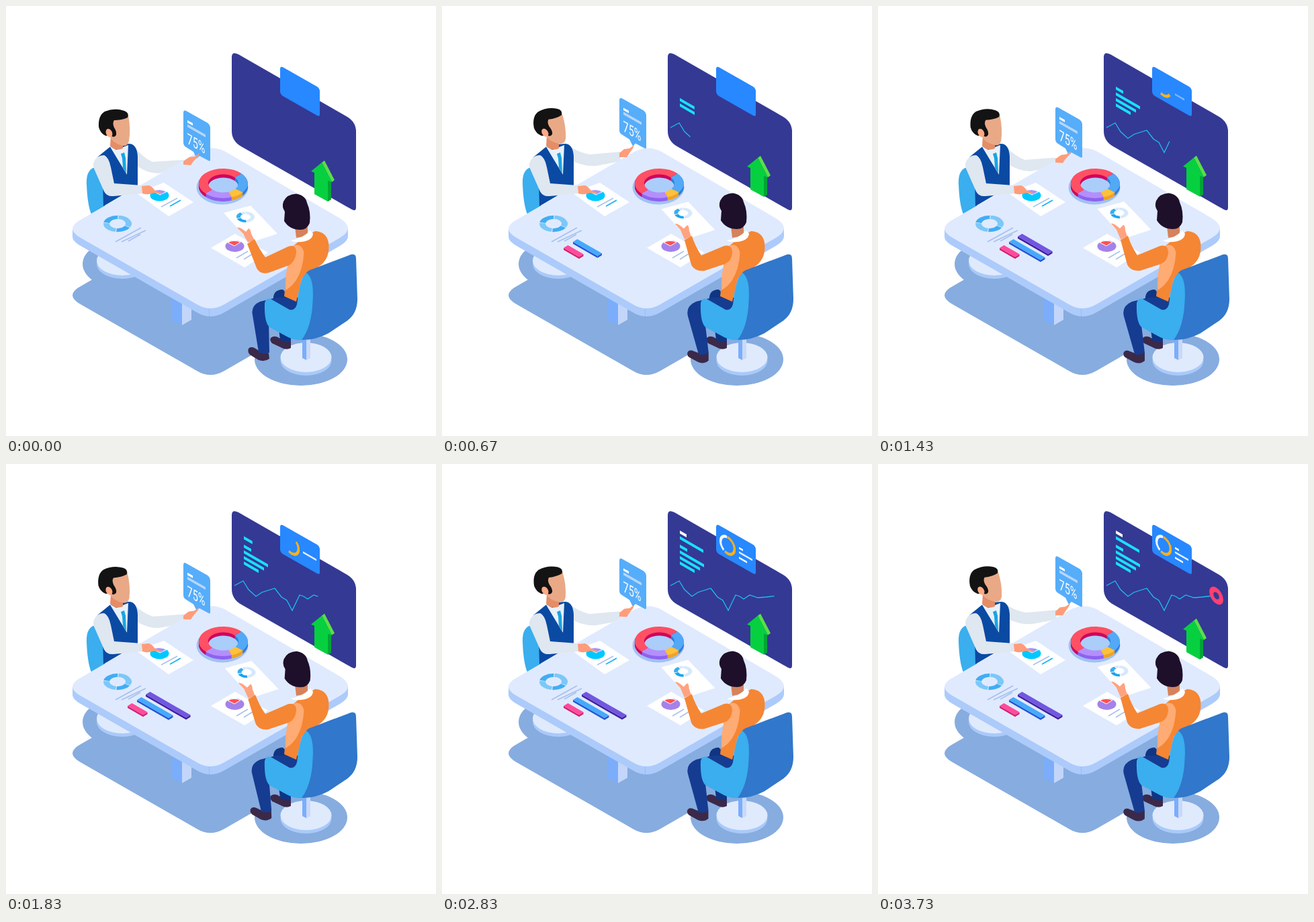
Write an HTML page that moves like this. It is 640x640 px and loops after 3.76 s.

```html
<!DOCTYPE html>
<html lang="en">
<head>
<meta charset="utf-8">
<title>Meeting</title>
<style>
  html, body { margin: 0; width: 100%; height: 100%; overflow: hidden; background: #fff; }
  svg { display: block; width: 100vw; height: 100vh; }
</style>
</head>
<body>
<svg viewBox="0 0 640 640">
  <defs>
    <path id="slab" d="M113 317L286 217Q307 206 327 217L497 316Q521 331 497 345L325 444Q304 456 284 444L111 345Q86 331 113 317Z"/>
  </defs>

  <!-- floor -->
  <g fill="#87acdf">
    <use href="#slab" y="99"/>
    <ellipse cx="183" cy="384" rx="69" ry="39"/>
    <ellipse cx="439" cy="526" rx="69" ry="39"/>
  </g>
  <ellipse cx="173" cy="384" rx="38" ry="22" fill="#a9caf9"/>
  <ellipse cx="173" cy="379" rx="38" ry="22" fill="#e0eafd"/>

  <!-- wall screen -->
  <path fill="#343994" d="M336 76Q336 67 346 72L508 165Q521 173 521 187V300Q521 306 515 303L350 209Q336 201 336 186Z"/>
  <path id="graph" pathLength="1" fill="none" stroke="#1cbfee" stroke-width="1.3" d="M340 181L353 174L361 187L372 197L381 191L400 185L410 198L418 203L426 218L437 195L443 197L449 201L458 195L470 199L482 198L495 196.500"/>
  <g id="lines"></g>
  <g transform="matrix(.866 .5 0 1 503.5 196)"><circle id="target" r="8.5" fill="none" stroke="#ff4070" stroke-width="7"/></g>
  <path fill="#2788ff" d="M408 94Q408 89 412 91L463 120Q467 123 467 127V162Q467 165 463 163L412 134Q408 131 408 127Z"/>
  <g transform="matrix(.866 .5 0 1 425 121)" fill="none" stroke-width="4">
    <path id="gaugeWhite" stroke="#f2f7ff"/>
    <path id="gaugeGold" stroke="#ffb01f"/>
  </g>
  <g id="notes"></g>
  <g id="arrow">
    <path fill="#5ade48" d="M470 233L474 230L489 259L485 262Z"/>
    <path fill="#00a636" d="M479 260L484 261V288L479 291Z"/>
    <path fill="#06d040" d="M454 246L470 233L485 262L479 260V291L459 280V248Z"/>
  </g>

  <!-- man on the left -->
  <path fill="#3aaeee" d="M133 240Q119 243 120 265Q121 295 127 310L147 300L150 240Z"/>
  <path class="point" fill="#dfe7f0" d="M190 209Q204 226 218 232L264 229L266 243L226 249Q210 249 195 238Z" data-to="M190 209Q204 218 220 221L265 217L266 231L229 238Q212 239 195 231Z"/>
  <path fill="#0a4aa3" d="M136 225L158 207L184 205Q195 206 196 224V268L145 298L144 260Z"/>
  <path fill="#e8f1fa" d="M154 208L164 214L182 207L180 251Z"/>
  <path fill="#1ba4e2" d="M171 220L176 218L178 226L179 249L174 241L173 227Z"/>
  <path fill="#e58d66" d="M156 194L174 200V212Q163 217 155 208Z"/>
  <g id="head">
    <path fill="#e9a987" d="M157 168L182 163Q186 183 183 201Q181 209 174 208Q160 205 154 194Z"/>
    <path fill="#131313" d="M138 180Q137 163 147 157Q162 151 176 156Q184 159 181 166Q173 170 161 170Q158 174 161 181Q165 187 164 192Q161 197 156 193L148 193Q140 189 138 180Z"/>
    <ellipse cx="153.500" cy="189" rx="4.500" ry="6.500" fill="#ffa985" transform="rotate(-25 153.500 189)"/>
  </g>

  <!-- table -->
  <path fill="#7badfb" d="M247 420H262V475L247 468Z"/>
  <path fill="#c3d6f9" d="M262 420H276V467L262 475Z"/>
  <g fill="#accbfb"><use href="#slab" y="12"/><path d="M99 331H509V343H99Z"/></g>
  <use href="#slab" fill="#e0eafe"/>
  <path stroke="#98bdf5" d="M302.500 451V462"/>
  <g id="tableRing" transform="translate(166 324) scale(1 .58)"></g>
  <path stroke="#a8c1ee" stroke-width="1.800" d="M163 351L201 330M172 351L208 334M182 350L200 340"/>
  <g id="bars"></g>
  <ellipse cx="322" cy="270" rx="38.500" ry="25.500" fill="#9fc2f5"/>
  <ellipse cx="323" cy="269" rx="26" ry="16" fill="#abcdfa"/>
  <g id="donut"></g>

  <!-- sheets -->
  <path fill="#fff" d="M194 278L235 263L279 292L242 313ZM305 360L341 339L390 367L355 389Z"/>
  <ellipse cx="228.500" cy="282" rx="14" ry="8.500" fill="#00c8ff"/>
  <path fill="#a98ff5" stroke="#fff" d="M229 281L219 275.500Q228 271 239 276.500Z"/>
  <path stroke="#a8c1ee" stroke-width="1.500" d="M231 299L255 286M343 375L360 365M354 377L367 369"/>
  <path stroke="#1bb4f3" stroke-width="1.800" d="M244 298L260 289"/>
  <ellipse cx="340.500" cy="357.500" rx="14" ry="8.500" fill="#a482ea"/>
  <path fill="#ff4f55" stroke="#fff" d="M340 357L330 352Q339 347 349 351.500Z"/>

  <!-- near arm of the man -->
  <path fill="#dfe7f0" d="M131 232Q135 222 146 222Q153 225 156 240L161 264L202 267L203 279L160 283Q150 284 146 276L131 242Q129 237 131 232Z"/>
  <path fill="#ff9c7a" d="M202 268L213 267Q219 270 221 274L235 280L220 278Q212 282 203 279Z"/>

  <!-- percent card -->
  <g id="card">
    <path fill="#56adfa" d="M264 159Q264 154 268 156L300 174Q304 177 304 182V229Q304 232 301 230L288 223L284 227L279 217L268 210Q264 208 264 203Z"/>
    <path fill="#fff" d="M270 170L278 174.500V178L270 173.500Z"/>
    <path fill="#b6d6fa" d="M270 176L297 191.500V195.500L270 180Z"/>
    <text transform="matrix(.66 .38 0 1 269.500 204.500)" font-family="Roboto, sans-serif" font-size="22" fill="#fff">75%</text>
  </g>
  <path class="point" fill="#ff9c7a" d="M264 231L273 225L281 224L288 219L286 224L279 231L275 237L264 236Z" data-to="M264 219L271 213L279 212L286 207L284 212L279 219L275 225L264 225Z"/>

  <!-- person on the right -->
  <g id="sheet">
    <path fill="#fff" d="M324 308L364 297L404 339L364 352Z"/>
    <g id="sheetRing" transform="translate(356.500 314) scale(1 .6)"></g>
  </g>
  <path class="lean" fill="#ffa37f" d="M360 352L353 339L344 330Q347 328 357 336L361 331Q364 332 365 339L370 349Z" data-to="M361 347L355 333L347 324Q350 322 360 331L365 326Q368 326 368 334L371 343Z"/>
  <ellipse cx="446.500" cy="528" rx="38" ry="22" fill="#a9caf9"/>
  <ellipse cx="446.500" cy="523" rx="38" ry="22" fill="#e0eafd"/>
  <path fill="#7badfb" d="M441 490H447V527L441 524Z"/>
  <path fill="#c9d9f7" d="M447 490H453V524L447 527Z"/>
  <path fill="#3b2949" d="M394 494Q400 489 408 495L424 500V509Q417 513 409 508L396 502Q392 498 394 494Z"/>
  <path fill="#0f3584" d="M398 440Q396 422 412 422L424 434V500Q414 502 408 497L404 465Z"/>
  <path class="lean" fill="#3b2949" d="M361 510Q364 506 370 509L378 514L391 517L392 525Q385 530 376 527L363 519Q359 515 361 510Z" data-to="M366 515Q369 511 375 514L383 517L397 516L397 528Q390 534 381 530L368 523Q364 520 366 515Z"/>
  <path class="lean" fill="#153c91" d="M402 434L378 440Q364 446 367 460L376 515Q385 520 392 516L391 466L430 460L440 434Z" data-to="M402 434L378 440Q362 447 366 462L382 518Q390 521 397 516L391 466L430 460L440 434Z"/>
  <path fill="#f58634" d="M436 350L460 335Q477 336 480 352Q483 374 468 386L440 405L432 440L414 432L422 362Z"/>
  <path fill="#ffab74" d="M424 358Q440 350 443.500 367Q442 392 432 408Q425 418 416 423Q415 398 421 380Z"/>
  <path class="lean" fill="#f58634" d="M359 354L370 347Q377 362 386 374L420 358Q432 354 432 367Q431 380 421 386L391 397Q378 400 373 390Z" data-to="M361 348L372 342Q377 358 386 371L420 357Q432 354 432 367Q431 380 421 384L390 394Q376 395 371 385Z"/>
  <path fill="#d5825d" d="M430 328L449 326V342L432 345Z"/>
  <path fill="#fff" d="M424 349Q440 347 453 334L457 339Q456 349 440 351Q428 352 424 349Z"/>
  <path id="hair" fill="#1e0f2b" d="M413 291Q418 280 432 279.500Q446 282 448 293Q454 306 452 323Q448 333 438 333Q422 333 414 320L415 306Q410 299 413 291Z"/>
  <path fill="#3177cb" d="M447 397Q449 394 455 392L513 370Q521 368 521 376L523 436Q523 458 507 469L480 487Q462 497 440 497Z"/>
  <path fill="#3aaeee" d="M447 397Q459 405 456.500 440Q455 477 440 497Q430 498 420 493L392 478Q384 470 385 442Q387 434 394 436L422 452Q430 454 433 444Q438 405 447 397Z"/>
</svg>
<script>
const LOOP = 3760;
const $ = id => document.getElementById(id);

const arc = (r, from, to) => {
  const at = deg => [Math.cos(deg * Math.PI / 180) * r, Math.sin(deg * Math.PI / 180) * r].map(v => v.toFixed(2)).join(' ');
  return `M${at(from)}A${r} ${r} 0 ${to - from > 180 ? 1 : 0} 1 ${at(to)}`;
};
const ring = (r, width, parts) => parts.map(([from, to, color]) =>
  `<path d="${arc(r, from, to)}" fill="none" stroke="${color}" stroke-width="${width}"/>`).join('');

// Strip running along the receding direction of the wall.
const strip = (x, y, w, h, color) =>
  `<path fill="${color}" d="M${x} ${y}l${w} ${w * .577}v${h}l${-w} ${-w * .577}z"/>`;

const bar = (x, y, len, top, side) => len <= 0 ? '' :
  strip(x, y, len, 3, side) +
  `<path fill="${side}" d="M${x + len} ${y + len * .577}l6.500 -4v3l-6.500 4z"/>` +
  `<path fill="${top}" d="M${x} ${y}l6.500 -4l${len} ${len * .577}l-6.500 4z"/>`;

$('tableRing').innerHTML = ring(16.5, 9, [[-85, 25, '#7cc8f7'], [29, 95, '#42adf3'], [99, 185, '#7cc8f7'], [189, 271, '#42adf3']]);
$('sheetRing').innerHTML = ring(10.5, 6, [[-90, 80, '#d5e9fb'], [85, 160, '#1ba5ef'], [168, 235, '#38adf0'], [240, 266, '#d5e9fb']]);

const sectors = [[-42, 37, '#53a9f6', '#2f7fe0'], [37, 70, '#ffc03a', '#eda32c'], [70, 137, '#b48ffc', '#8f62f0'], [137, 318, '#ff5064', '#cf0560']];
for (let dy = 5; dy >= 0; dy--) {
  const parts = sectors.map(([from, to, top, side]) => [from, to, dy ? side : top]);
  $('donut').innerHTML += `<g transform="translate(323.500 ${264 + dy}) scale(1 .6)">${ring(29.5, 14, parts)}</g>`;
}

// x, y, full length, start, end, colour
const screenLines = [
  [354, 145, 22, 150, 480, '#1ae0fb'], [354, 137, 30, 460, 750, '#1ae0fb'],
  [354, 128.500, 36, 770, 1120, '#1ae0fb'], [354, 120, 11, 1130, 1400, '#1ae0fb'],
  [354, 107.500, 35, 1580, 2270, '#1ae0fb'], [354, 99, 10, 2300, 2600, '#fff'],
];
const noteLines = [
  [442, 130, 20, 1150, 1550, '#e6f1ff'], [442, 123.500, 6, 1800, 2100, '#fff'], [442, 138, 12, 1850, 2250, '#fff'],
];
const tableBars = [
  [208, 343, 60, 800, 1640, '#7157e0', '#41209c'],
  [195, 351, 47, 330, 770, '#46a9fa', '#2456d4'],
  [181, 360, 23, 40, 360, '#ff4b9c', '#d3226f'],
];

const progress = (t, start, end) => Math.min(1, Math.max(0, (t - start) / (end - start)));
// Falls smoothly from 1 to 0 and back within each period.
const pulse = (t, period, power) => ((1 + Math.cos(2 * Math.PI * t / period)) / 2) ** power;

const number = /-?\d+(\.\d+)?/g;
const poses = [...document.querySelectorAll('[data-to]')].map(el => ({
  el, from: el.getAttribute('d'), to: el.dataset.to.match(number).map(Number), kind: el.getAttribute('class'),
}));

function draw(t) {
  const low = pulse(t, 1600, 2.8);
  const near = pulse(t, 2240, 3);
  for (const { el, from, to, kind } of poses) {
    const k = 1 - (kind === 'point' ? low : near);
    let i = 0;
    el.setAttribute('d', from.replace(number, n => (+n + (to[i++] - n) * k).toFixed(2)));
  }
  const move = (id, x, y) => $(id).setAttribute('transform', `translate(${x} ${y})`);
  move('card', 0, -18.5 * (1 - low));
  move('sheet', 2.5 * (1 - near), -6 * (1 - near));
  move('hair', 1 - near, near - 1);
  move('arrow', 0, -7.3 * (1 - pulse(t, LOOP, 9)));
  $('head').setAttribute('transform', `rotate(${-7 * (1 - low)} 150 190)`);

  const drawn = 1 - pulse(Math.min(t, 3400), 6800, 2.3);
  $('graph').setAttribute('stroke-dasharray', `${drawn} 2`);

  $('lines').innerHTML = screenLines.map(([x, y, w, a, b, c]) => strip(x, y, w * progress(t, a, b), 4.5, c)).join('');
  $('notes').innerHTML = noteLines.map(([x, y, w, a, b, c]) =>
    `<g opacity="${progress(t, a, b + 250)}">${strip(x, y, w * progress(t, a, b), 2.8, c)}</g>`).join('');
  $('bars').innerHTML = tableBars.map(([x, y, w, a, b, top, side]) => bar(x, y, w * progress(t, a, b), top, side)).join('');

  const sweep = 350 * progress(t, 1000, 2800);
  $('gaugeGold').setAttribute('d', sweep ? arc(12, 113 - Math.min(sweep, 206), 113) : '');
  $('gaugeWhite').setAttribute('d', sweep > 208 ? arc(12, 113 - sweep, -95) : '');

  const pop = 1 - (1 - progress(t, 2850, 3230)) ** 2;
  $('target').setAttribute('transform', `scale(${pop})`);
}

const start = performance.now();
function tick() {
  draw((performance.now() - start) % LOOP);
  requestAnimationFrame(tick);
}
tick();
</script>
</body>
</html>
```
